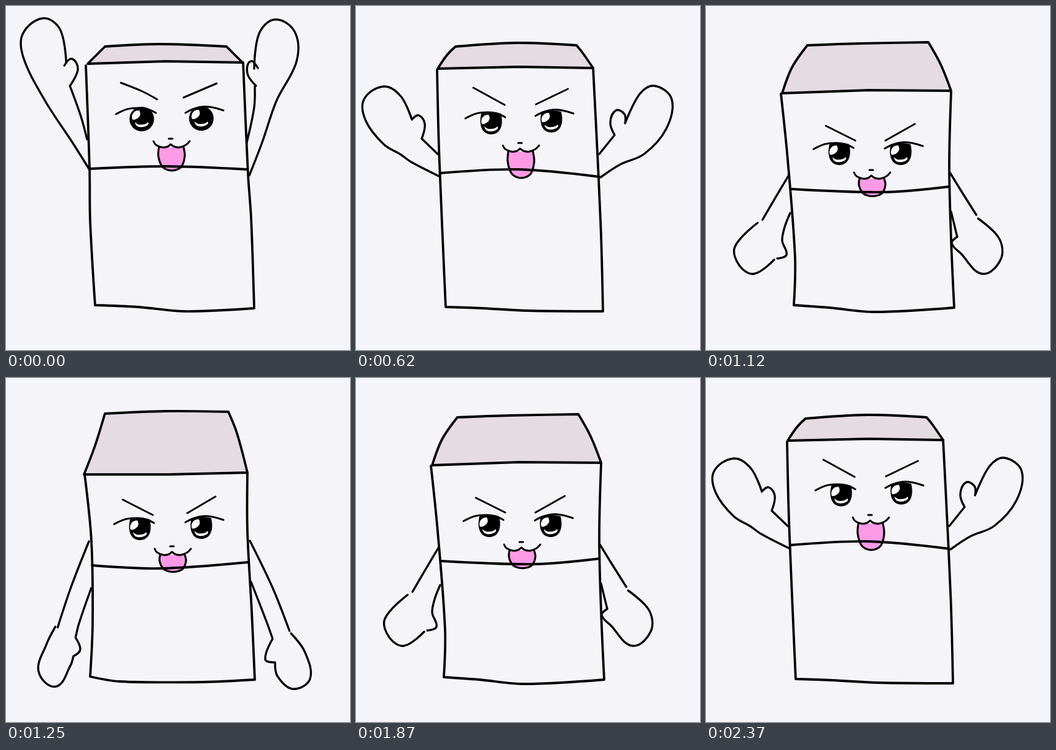
These frames come from a looping animation (560 px wide and 560 px high, 2.5 s). An HTML page with a canvas:

```html
<!DOCTYPE html>
<html>
<head>
<meta charset="utf-8">
<style>
html, body { margin: 0; width: 100%; height: 100%; overflow: hidden; background: #f5f4f8; }
canvas { display: block; }
</style>
</head>
<body>
<canvas id="stage" width="560" height="560"></canvas>
<script>
const ctx = document.getElementById('stage').getContext('2d');

// Strokes are "x,y" points, "|" starts a new stroke, "!" marks a corner.
const parse = text => text.split('|').map(stroke =>
  stroke.split(' ').map(p => [...p.split(',').map(parseFloat), p.endsWith('!')]));
const mapPoints = (strokes, fn) => strokes.map((s, i) => s.map((p, j) => fn(p, i, j)));
const shift = (strokes, [dx, dy]) => mapPoints(strokes, ([x, y, c]) => [x + dx, y + dy, c]);
const middle = (a, b) => mapPoints(a, ([x, y, c], i, j) =>
  [(x + b[i][j][0]) / 2, (y + b[i][j][1]) / 2, c]);
const parseAll = texts => Object.fromEntries(Object.entries(texts).map(([k, v]) => [k, parse(v)]));

const up = parseAll({
  lid: '133,94! 145,82 161,66! 250,62 359,66! 366,73 385,92! 260,90',
  body: '130,97! 136,264 137,350 145,487! 215,490 290,497 404,492! 399,345 394,274 386,92!',
  waist: '137,265 263,261 391,266',
  left: '135,265 108,222 64,155 29,86 27,46 60,20 88,38 98,92|95,97 107,86 117,103 104,130! 122,180 132,217',
  right: '392,222 404,165 405,131|410,101 398,90 393,110 407,130|404,102 412,45 438,22 470,42 473,90 440,155 417,222 396,276',
  brows: '187,125 222,139 246,152|343,126 289,149',
  eyes: '221,184 318,183',
  mouth: '268,226'
});
const upNear = parseAll({
  lid: '133,93! 148,80 161,66! 245,62 354,63! 366,73 386,90! 260,88',
  body: '130,96! 135,260 140,360 145,487! 225,490 315,495 405,493! 402,410 393,265 386,90!',
  waist: '136,262 260,260 391,265',
  left: '132,259 87,183 57,135 38,78 42,39 70,24 100,33 106,93|98,105 112,91 122,104 106,131! 123,180 132,214',
  right: '393,212 402,175 409,132|412,97 400,93 393,110 409,130|405,94 401,45 425,20 455,21 467,68 452,142 417,225 396,272',
  brows: '186,124 246,149|344,124 287,147',
  eyes: '221,183 319,182',
  mouth: '268,224'
});
const raised = parseAll({
  lid: '133,102! 148,80 162,66! 262,60 359,64! 368,75 386,101! 265,99',
  body: '132,104! 135,230 142,400 146,490! 205,492 280,496 402,497! 399,375 393,240 386,101!',
  waist: '137,272 265,266 396,278',
  left: '137,278 90,254 73,242 45,225 16,187 13,152 45,131 73,147 91,185! 102,178 112,192 107,216! 133,241',
  right: '396,241 421,210! 414,190 423,170 437,176 438,191! 462,143 486,130 514,152 505,200 469,241 430,258 398,279',
  brows: '191,133 242,161|345,135 293,160',
  eyes: '220,191 318,188',
  mouth: '267,233'
});
const lowered = parseAll({
  lid: '124,142! 140,100 165,64! 250,61 362,59! 382,95 399,138! 265,137',
  body: '122,143! 133,250 145,410 143,487! 200,491 275,498 404,491! 399,380 396,260 399,139!',
  waist: '140,298 290,303 396,294',
  left: '135,275 113,312 92,348|84,353 47,392 54,422 78,436 111,413|116,411 131,405 124,382 128,360 137,337',
  right: '397,271 416,302 440,340|443,346 477,378 480,412 450,436 415,403 400,386 409,376! 399,335',
  brows: '195,195 243,219|340,192 292,219',
  eyes: '217,241 317,241',
  mouth: '269,277'
});
const down = parseAll({
  lid: '127,157! 145,110 161,58! 260,54 362,55! 376,90 393,154! 265,157',
  body: '128,157! 139,265 141,400 137,486! 185,494 320,495 405,491! 400,380 393,250 393,155!',
  waist: '140,305 250,310 393,300',
  left: '135,266 106,340 92,407|88,406 77,435 67,480 95,505 119,470 123,455! 133,444 123,424! 126,400 139,342',
  right: '397,265 434,342 453,413|455,417 474,448 481,492 453,509 428,488 424,465! 408,460 424,426! 418,400 399,332',
  brows: '190,198 239,223|341,193 295,220',
  eyes: '218,246 318,244',
  mouth: '270,284'
});

// The hands swing outwards, more so the lower they hang.
const spread = (arm, side) => mapPoints(arm, ([x, y, c]) =>
  [x + side * 14 * Math.max(0, Math.min(1, (y - 340) / 120)), y - Math.max(0, y - 340) / 60, c]);
const downWide = { ...down, left: spread(down.left, -1), right: spread(down.right, 1) };

const level = {};
for (const part of ['lid', 'body', 'waist', 'brows', 'eyes', 'mouth']) {
  level[part] = middle(raised[part], lowered[part]);
}
level.left = parse('135,258 88,274! 52,267 23,308 55,339 90,318! 103,331 106,312! 138,301');
level.right = mapPoints(level.left, ([x, y, c]) => [534 - x, y, c]);

up.round = upNear.round = true;
up.depth = upNear.depth = 41;
raised.depth = 46;
level.depth = 38;
lowered.depth = 32;
down.depth = downWide.depth = 31;

const poses = [up, upNear, up, raised, level, lowered, downWide, down, downWide, lowered, level, raised];
const ends = [250, 500, 620, 870, 1120, 1250, 1500, 1750, 1870, 2120, 2370, 2500];

// Smooth curve through the points; corners get no tangent.
function curve(strokes, closed) {
  const path = new Path2D();
  for (const pts of strokes) {
    const handle = (i, len) => {
      const a = pts[i - 1], b = pts[i + 1];
      if (!a || !b || pts[i][2]) return [0, 0];
      const k = len / 3 / Math.hypot(b[0] - a[0], b[1] - a[1]);
      return [(b[0] - a[0]) * k, (b[1] - a[1]) * k];
    };
    path.moveTo(pts[0][0], pts[0][1]);
    for (let i = 1; i < pts.length; i++) {
      const [x0, y0] = pts[i - 1], [x, y] = pts[i];
      const len = Math.hypot(x - x0, y - y0);
      const h0 = handle(i - 1, len), h1 = handle(i, len);
      path.bezierCurveTo(x0 + h0[0], y0 + h0[1], x - h1[0], y - h1[1], x, y);
    }
    if (closed) path.closePath();
  }
  return path;
}

const lashes = [
  parse('-42,-8 -24,-16 -5,-18 10,-16 23,-10'),
  parse('-26,-9 -14,-15 2,-19 18,-18 36,-13')
];
const muzzle = parse('-28,-6 -24,0 -14,4 -5,3 0,-1! 6,3 15,4 25,0 31,-6|-3,-10 3,-10');
const roundEye = new Path2D('M0 -20A20 20 0 0 1 0 20A20 20 0 0 1 0 -20Z');
const flatEye = new Path2D('M-16 -16Q0 -20 16 -16C21 4 14 18 0 18S-21 4 -16 -16Z');
const glint = new Path2D('M-15 -8Q-11 -15 -4 -14Q-1 -8 -4 -4Q-9 2 -15 1Q-17 -3 -15 -8Z');
const shine = new Path2D('M-11 5Q-7 10 0 9Q7 9 10 5Q13 8 8 11Q0 15 -7 12Q-11 9 -11 5Z');

function fill(path, color) {
  ctx.fillStyle = color;
  ctx.fill(path);
}

function line(path, width) {
  ctx.lineWidth = width;
  ctx.stroke(path);
}

function draw({ lid, body, waist, left, right, brows, eyes, mouth, depth: d, round }) {
  ctx.fillStyle = '#f5f4f8';
  ctx.fillRect(0, 0, 560, 560);
  const top = curve(lid, true);
  const lips = mouth[0][0];
  const tongue = curve(shift([[
    [-19, 4], [-20, d * 0.45], [-14, d * 0.85], [-4, d], [8, d], [18, d * 0.85], [23, d * 0.45], [21, 4]
  ]], lips));
  fill(top, '#e5dce3');
  fill(tongue, '#fc9ae6');
  line(tongue, 3.2);
  for (const part of [top, curve(body), curve(waist)]) line(part, 3.8);
  for (const arm of [left, right]) line(curve(arm), 3.4);
  line(curve(brows), 3);
  line(curve(shift(muzzle, lips)), 3);
  eyes[0].forEach((eye, i) => {
    line(curve(shift(lashes[i], eye)), 3);
    ctx.save();
    ctx.translate(eye[0], eye[1]);
    fill(round ? roundEye : flatEye, '#000');
    fill(glint, '#fff');
    fill(shine, '#fff');
    ctx.restore();
  });
}

function tick() {
  const t = performance.now() % 2500;
  draw(poses[ends.findIndex(end => t < end)]);
  requestAnimationFrame(tick);
}

ctx.lineCap = ctx.lineJoin = 'round';
tick();
</script>
</body>
</html>
```
